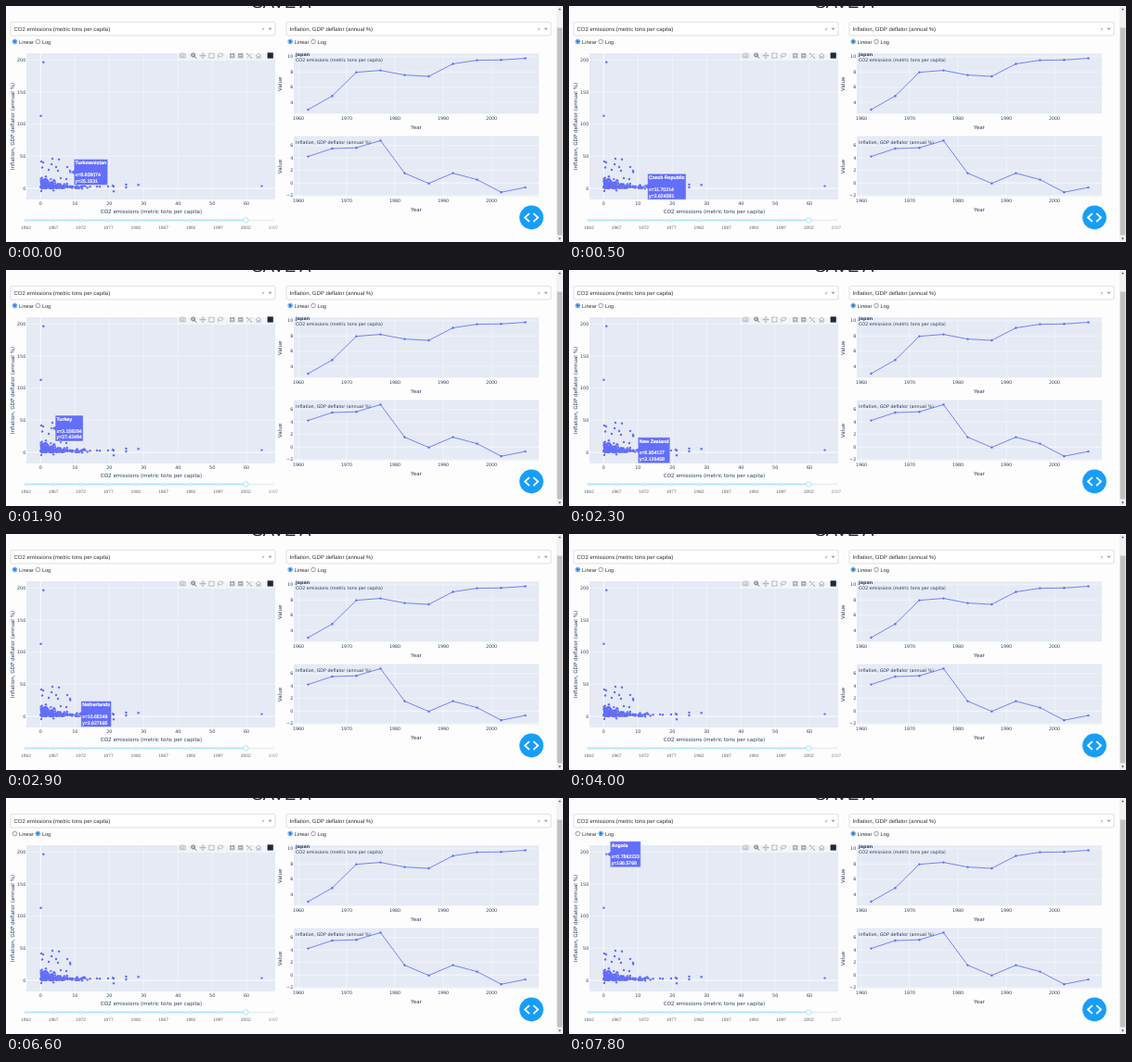
An HTML page that plays this animation: 600x255 px, repeating every 8000 ms.

```html
<!DOCTYPE html>
<html lang="en">
<head>
<meta charset="utf-8">
<title>Indicator dashboard</title>
<style>
html, body { margin: 0; height: 100%; overflow: hidden; background: #fefdfe; }
svg { display: block; width: 100vw; height: 100vh; text-rendering: geometricPrecision; }
.ui { font: 6px "Liberation Sans", sans-serif; fill: #333; }
.radio { font-size: 5.6px; }
.tick { font: 4.8px "DejaVu Sans", sans-serif; fill: #2a3f5f; }
.axis { font: 5.6px "DejaVu Sans", sans-serif; fill: #2a3f5f; }
.year { font: 4.8px "Liberation Sans", sans-serif; fill: #666; }
.tip { font: 5.2px "Liberation Sans", sans-serif; fill: #fff; stroke: #fff; stroke-width: .2; }
.title { font: 18.3px "Liberation Sans", sans-serif; fill: #222; }
.pale { fill: #999; }
.bold { font-weight: bold; }
.mid { text-anchor: middle; }
.end { text-anchor: end; }
</style>
</head>
<body>
<svg id="stage" viewBox="0 0 600 255"></svg>
<script>
const LOOP = 8000, BLUE = '#636efa', PLOT = '#e5eaf5';
const INFLATION = 'Inflation, GDP deflator (annual %)';
const CO2 = 'CO2 emissions (metric tons per capita)';
const stage = document.getElementById('stage');

function add(tag, attrs, parent = stage) {
  const el = document.createElementNS('http://www.w3.org/2000/svg', tag);
  for (const k in attrs) el.setAttribute(k, attrs[k]);
  return parent.appendChild(el);
}
function text(str, x, y, cls, more = {}, parent = stage) {
  const el = add('text', { x, y, class: cls, ...more }, parent);
  el.textContent = str;
  return el;
}
const rect = (x, y, width, height, fill, more = {}, parent = stage) =>
  add('rect', { x, y, width, height, fill, ...more }, parent);
const dot = (cx, cy, r, fill, more = {}, parent = stage) =>
  add('circle', { cx, cy, r, fill, ...more }, parent);
const path = (d, stroke, width, more = {}, parent = stage) =>
  add('path', { d, stroke, 'stroke-width': width, fill: 'none', ...more }, parent);
const vertical = (str, x, y) =>
  text(str, 0, 0, 'axis mid', { transform: `translate(${x} ${y}) rotate(-90)` });

// Controls
function dropdown(x, label) {
  rect(x, 17.3, 285, 14.6, '#fff', { rx: 1.6, stroke: '#ccc', 'stroke-width': .6 });
  text(label, x + 3.5, 26.9, 'ui');
  text('×', x + 272, 26.5, 'ui mid pale');
  path(`M${x + 277.5} 23.8h4l-2 2.1z`, 'none', 0, { fill: '#999' });
}
function radio(x, label) {
  const ring = dot(x, 38.5, 2.3, '#fff', { 'stroke-width': .7 });
  const core = dot(x, 38.5, 1.4, '#0b6fe0');
  text(label, x + 4.6, 40.6, 'ui radio');
  return on => {
    ring.setAttribute('stroke', on ? '#0b6fe0' : '#767676');
    core.setAttribute('opacity', +on);
  };
}
text('SAVE A', 296.5, 2.3, 'title mid');
dropdown(5, CO2);
dropdown(302, INFLATION);
const linear = radio(9.5, 'Linear'), log = radio(34.3, 'Log');
radio(306.2, 'Linear')(true);
radio(331, 'Log')(false);

// Scatter plot
const px = v => 37.4 + v * 3.695, py = v => 197 - v * .693;
rect(22, 51, 268, 158, PLOT);
for (let v = 0; v <= 60; v += 10) {
  path(`M${px(v)} 51V209`, '#fff', v ? .4 : .8);
  text(v, px(v), 215, 'tick mid');
}
for (let v = 0; v <= 200; v += 50) {
  path(`M22 ${py(v)}H290`, '#fff', v ? .4 : .8);
  text(v, 21.2, py(v) + 1.5, 'tick end');
}
text(CO2, 156.5, 223.8, 'axis mid');
vertical(INFLATION, 8.5, 130);

// start time, country, x, y; a missing country hides the label
const hovers = [
  [0, 'Turkmenistan', '8.608074', '25.1531'],
  [500, 'Czech Republic', '11.70214', '2.624581'],
  [800, 'Hong Kong, China', '3.701846', '-3.41927'],
  [1300, 'Togo', '0.2395977', '6.216923'],
  [1500, 'Yemen, Rep.', '1.049216', '11.92743'],
  [1900, 'Turkey', '3.158284', '37.42484'],
  [2300, 'New Zealand', '8.904127', '3.126458'],
  [2500, 'Saudi Arabia', '13.01582', '3.218846'],
  [2900, 'Netherlands', '10.65249', '3.627695'],
  [3300, 'Finland', '12.08316', '3.641729'],
  [3400],
  [7800, 'Angola', '0.7862233', '196.5768']
];
const outliers = [[37.5, 118.7], [275.5, 194.6], [142.6, 193.2], [129.4, 193], [129.4, 196],
  [116, 195], [116, 200.2], [115, 194.2], [110, 195], [101, 195.2], [98, 195], [90.5, 195.2],
  [50, 165], [57, 165.8], [38, 168], [40, 169], [39, 174.5], [66, 174], [69, 178], [54, 174],
  [46, 177], [56, 178], [59, 186], [65, 187], [38, 200]];
let seed = 11;
const rand = () => (seed = seed * 16807 % 2147483647) / 2147483647;
const points = [...outliers];
for (const [, name, x, y] of hovers) if (name) points.push([px(+x), py(+y)]);
for (let i = 0; i < 190; i++) {
  const x = 37.5 - 15 * Math.log(1 - rand() * .965);
  const spread = Math.max(1.4, 4 - (x - 37.5) / 15);
  points.push([x, Math.max(180, 196.2 + rand() * 1.2 + spread * Math.log(1 - rand() * .98))]);
}
for (const [x, y] of points) dot(x, y, 1.2, BLUE);

// Plot toolbar
const bar = add('g', {});
rect(185.5, 49, 104, 9.4, '#fff', { opacity: .5 }, bar);
const icon = (d, shade = .35) =>
  path(d, '#444', .9, { 'stroke-opacity': shade }, bar);
icon('M187.3 51.8h1.5l.6-.9h1.6l.6.9h1.6v4h-5.9zM189 53.8a1.2 1.2 0 1 0 2.4 0a1.2 1.2 0 1 0-2.4 0');
icon('M199.6 53a2 2 0 1 0 4 0a2 2 0 1 0-4 0M203 54.5l2.3 2.2M200.6 53h2', .8);
icon('M209 53.6h6M212 50.6v6M211 51.5l1-1l1 1M211 55.7l1 1l1-1M210 52.6l-1 1l1 1M214 52.6l1 1l-1 1');
icon('M218.8 51h5.2v5.2h-5.2z');
icon('M228.5 54.5q-1-3.2 3-3.4q3.6.4 1.8 2.7q-2.2 1.4-4 .2l-.6 2.6');
for (const x of [241, 250]) {
  rect(x, 50.9, 5.4, 5.4, '#444', { opacity: .4 }, bar);
  path(`M${x + 1.2} 53.6h3` + (x < 245 ? `m-1.5-1.5v3` : ''), PLOT, .8, {}, bar);
}
icon('M259.4 51.2l5 5M264.4 51.2l-5 5M259.4 52.5v-1.3h1.3M263.1 56.2h1.3v-1.3');
icon('M269.2 53.7l2.9-2.6l2.9 2.6M270.1 53.4v2.9h1.3v-1.8h1.4v1.8h1.3v-2.9');
rect(281.6, 50.4, 6.2, 6.2, '#20283a', {}, bar);

// Time series
const tx = year => 315 + (year - 1960) * 5.2;
function series(top, ticks, ty, ys) {
  rect(310, top, 264, 65, PLOT);
  for (let y = 1960; y <= 2000; y += 10) {
    path(`M${tx(y)} ${top}v65`, '#fff', .4);
    text(y, tx(y), top + 71.8, 'tick mid');
  }
  for (const v of ticks) {
    path(`M310 ${ty(v)}h264`, '#fff', v ? .4 : .8);
    text(String(v).replace('-', '−'), 309.2, ty(v) + 1.6, 'tick end');
  }
  const spots = ys.map((y, i) => [tx(1962 + 5 * i), y]);
  path('M' + spots.join('L'), BLUE, .85);
  for (const [x, y] of spots) dot(x, y, 1.2, BLUE);
  text('Year', 442, top + 81.6, 'axis mid');
  vertical('Value', 296.9, top + 33);
}
series(51.3, [10, 8, 6, 4], v => 54.8 + (10 - v) * 8.25,
  [112, 97.2, 71.6, 69.6, 74.6, 76, 62.5, 58.6, 58.3, 56.5]);
text('Japan', 312, 54.3, 'tick bold');
text(CO2, 312, 60, 'tick');
series(140.5, [6, 4, 2, 0, -2], v => 191.2 - v * 6.75,
  [162.6, 154, 153.2, 145.4, 180.6, 191.7, 180.6, 187.6, 201.2, 196.1]);
text(INFLATION, 312, 149, 'tick');

// Year slider
const step = i => 21.5 + 29.6 * i;
path(`M${step(0)} 231.5H${step(9)}`, '#e9e9e9', 1.4);
path(`M${step(0)} 231.5H${step(8)}`, '#abe2fb', 1.4);
for (let i = 0; i < 10; i++) {
  dot(step(i), 231.5, i === 8 ? 2.7 : 1.4, '#fff',
    { stroke: i < 9 ? '#96dbfa' : '#e9e9e9', 'stroke-width': .8 });
  text(1962 + 5 * i, step(i), 241, i < 9 ? 'year mid' : 'year mid pale');
}

// Debug button and scrollbar
dot(566, 228.5, 12.9, '#189ef8');
path('M563.8 224.2l-4.8 4.4l4.8 4.4M568.2 224.2l4.8 4.4l-4.8 4.4', '#fff', 1.8);
rect(593, 0, 7, 255, '#f1f1f1');
rect(593.7, 23.5, 5.6, 224, '#c1c1c1');
path('M594.9 4.2l1.6-1.8l1.6 1.8zM594.9 250.6l1.6 1.8l1.6-1.8z', 'none', 0, { fill: '#505050' });

// Hover label
const label = add('g', {});
const box = path('', '#fff', .4, { fill: BLUE }, label);
const lines = [-8.1, 4.6, 11.4].map((y, i) =>
  text('', 5.4, y, i ? 'tip' : 'tip bold', {}, label));
let shown;
function showHover(hover) {
  if (hover === shown) return;
  shown = hover;
  const [, name, x, y] = hover;
  label.setAttribute('visibility', name ? 'visible' : 'hidden');
  if (!name) return;
  [name, 'x=' + x, 'y=' + y].forEach((s, i) => lines[i].textContent = s);
  const w = Math.max(...lines.map(l => l.getComputedTextLength())) + 2.8;
  box.setAttribute('d', `M0 0L4 -2.4V-14h${w}v28H4V2.4z`);
  label.setAttribute('transform', `translate(${px(+x)} ${py(+y)})`);
}

// Pointers
const arrow = path('M79.3 68.8v6.8l1.6-1.4l1.1 2.4l1-.5l-1.1-2.3h2.2z', '#111', .5, { fill: '#fff' });
const hand = path('M34 38.2q.7-1 1.4 0v3l3.1.6q.9.3.8 1.2l-.7 4h-3.6l-2.7-3.4q.1-1 1.7.2z',
  '#111', .5, { fill: '#fff' });

const during = (t, from, to) => +(t >= from && t < to);
function barOpacity(t) {
  if (t < 4900) return 1;
  if (t < 5000) return .4;
  if (t < 5900) return 0;
  return t < 6100 ? .45 : 1;
}
function draw(now) {
  const t = now % LOOP, isLog = t >= 5200;
  linear(!isLog);
  log(isLog);
  showHover(hovers.filter(h => h[0] <= t).pop());
  bar.setAttribute('opacity', barOpacity(t));
  hand.setAttribute('opacity', during(t, 5000, 5400));
  arrow.setAttribute('opacity', during(t, 5700, 5900));
}
const start = performance.now();
function tick() {
  draw(performance.now() - start);
  requestAnimationFrame(tick);
}
tick();
</script>
</body>
</html>
```
